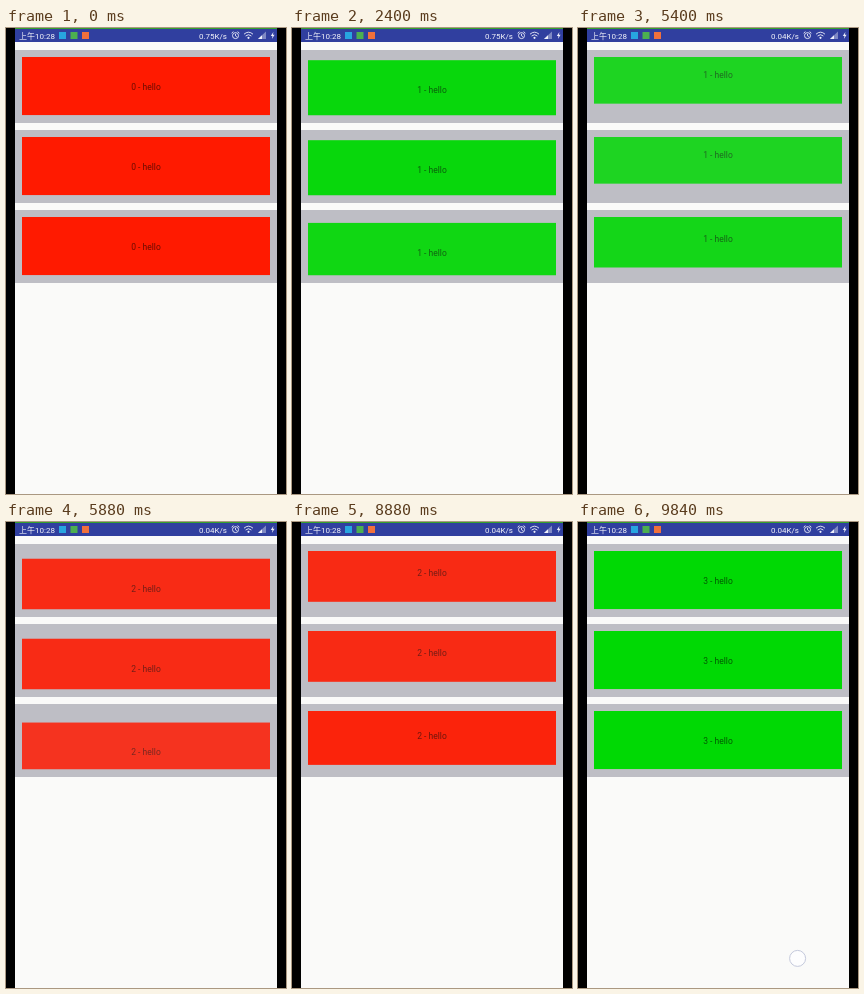
An HTML page that plays this animation: 280x466 px, repeating every 9.96 s.

```html
<!DOCTYPE html>
<html lang="zh">
<head>
<meta charset="utf-8">
<style>
  html, body { margin: 0; height: 100%; overflow: hidden; background: #000; }
  svg { display: block; }
  text { font-family: Roboto, "Noto Sans CJK SC", "Noto Sans CJK", sans-serif; }
  .status text { font-size: 8px; fill: #f4f5fb; }
  .label { font-size: 8.5px; text-anchor: middle; fill: rgba(0, 0, 0, .58); }
</style>
</head>
<body>
<svg id="stage" width="280" height="466" viewBox="0 0 280 466">
  <rect width="280" height="466"/>
  <rect x="9" width="262" height="466" fill="#fafaf9"/>
  <g class="status">
    <rect x="9" width="262" height="14" fill="#303f9f"/>
    <rect x="9" width="262" height="1" fill="#35a02e"/>
    <text x="13" y="10.6">上午10:28</text>
    <rect x="53" y="4" width="7" height="7" fill="#27a5e0"/>
    <rect x="64.5" y="4" width="7" height="7" fill="#4caf50"/>
    <rect x="76" y="4" width="7" height="7" fill="#f0703c"/>
    <text id="speed" x="221" y="10.6" text-anchor="end"></text>
    <g fill="none" stroke="#eef0fa" stroke-width=".9">
      <circle cx="229.5" cy="7.6" r="3"/>
      <path d="M229.5 5.8v2l1.3.8M225.6 5.2l1.8-1.6M233.4 5.2l-1.8-1.6"/>
      <path d="M238 6.2q4.5-4 9 0M239.6 8q2.9-2.6 5.8 0"/>
    </g>
    <circle cx="242.5" cy="9.8" r="1.1" fill="#eef0fa"/>
    <path id="arrow" d="M245 8.5h2.4l-1.2 2.5z" fill="#eef0fa"/>
    <path d="M260 3.5v7.5h-8z" fill="#7f89c4"/>
    <path d="M256 7.2v3.8h-4z" fill="#eef0fa"/>
    <path d="M267.4 4l-2.6 4h1.7l-.6 3 2.7-4.2h-1.7z" fill="#eef0fa"/>
  </g>
  <g id="cards"></g>
  <circle id="touch" cx="219.6" cy="436.4" r="8" fill="#fdfdfe" stroke="#c4c9dc"/>
</svg>
<script>
const LOOP = 9960, TICK = 120, FLIP = 910, TRAVEL = 73;
const starts = [1612, 5162, 8691];
const delays = [0, 0, 45];
const blinks = [3360, 6240, 6840];
const colors = ['#ff1a00', '#00d904'];
const $ = id => document.getElementById(id);

function add(parent, tag, attrs) {
  const el = document.createElementNS('http://www.w3.org/2000/svg', tag);
  for (const k in attrs) el.setAttribute(k, attrs[k]);
  return parent.appendChild(el);
}

function makePage(view) {
  const g = add(view, 'g', {});
  const rect = add(g, 'rect', { width: 248, height: 58.3 });
  const text = add(g, 'text', { class: 'label', x: 124, y: 32.8 });
  return { g, rect, text };
}

const cards = delays.map((delay, i) => {
  const y = 22 + 80 * i;
  add($('cards'), 'rect', { x: 9, y, width: 262, height: 73, fill: '#bebec5' });
  const view = add($('cards'), 'svg', { x: 16, y: y + 7, width: 248, height: 58.3, overflow: 'hidden' });
  return { delay, pages: [makePage(view), makePage(view)] };
});

function setPage({ g, rect, text }, n, y, alpha) {
  g.setAttribute('transform', `translate(0 ${y})`);
  g.setAttribute('opacity', alpha);
  rect.setAttribute('fill', colors[n % 2]);
  text.textContent = n + ' - hello';
}

function draw(t) {
  for (const { delay, pages } of cards) {
    const passed = starts.filter(s => t >= s + delay).length;
    const n = Math.max(passed - 1, 0);
    const x = Math.min(Math.max((t - starts[n] - delay) / FLIP, 0), 1);
    const p = (1 - Math.cos(Math.PI * x)) / 2;
    setPage(pages[0], n, -TRAVEL * p, 1 - p);
    setPage(pages[1], n + 1, TRAVEL * (1 - p), p);
  }
  $('speed').textContent = t < 2760 ? '0.75K/s' : '0.04K/s';
  $('arrow').style.opacity = blinks.includes(t) ? 1 : 0;
  $('touch').style.opacity = t >= 9840 ? 1 : 0;
}

const origin = performance.now();
function frame() {
  const t = (performance.now() - origin) % LOOP;
  draw(Math.floor(t / TICK) * TICK);
  requestAnimationFrame(frame);
}
frame();
</script>
</body>
</html>
```
